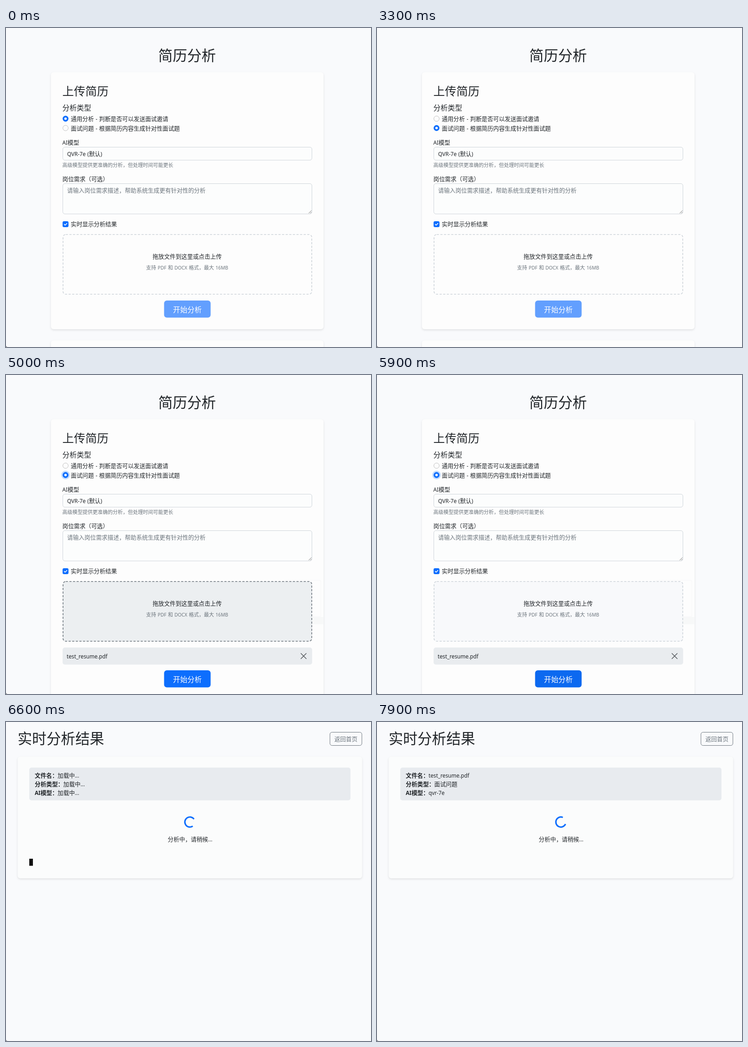
Animation of 800x700 px, one loop 8000 ms. Source, as an HTML page:

```html
<!DOCTYPE html>
<html lang="zh-CN">
<head>
<meta charset="utf-8">
<title>简历分析</title>
<style>
  html, body { margin: 0; width: 100%; height: 100%; overflow: hidden; background: #f9fafc; }
  svg { display: block; width: 800px; height: 700px; }
  text { font-family: "Noto Sans", "Noto Sans CJK SC", "Noto Sans CJK", sans-serif; fill: #212529; word-spacing: .06em; }
  .latin { font-size: .93em; }
  .muted { fill: #6c757d; }
  .light { fill: #fff; }
  .copy { fill: #1f4fd8; }
  .bold { font-weight: 700; }
  .card { fill: #fdfdfd; filter: drop-shadow(0 2px 2px rgba(0, 0, 0, .1)); }
  .field { fill: #fcfdfd; stroke: #ced4da; }
  .panel { fill: #e9ecef; }
</style>
</head>
<body>
<svg viewBox="0 0 800 700" id="stage"></svg>
<script>
const LOOP = 8000, STEP = 100;
const BODY = 12.65, SMALL = 11.05, LARGE = 15.8, HEADING = 25.3, TITLE = 31.6;
const BLUE = '#0d6efd';

// Latin runs are set slightly smaller than the Chinese around them.
const latin = str => str.replace(/[\x20-\x7e]+/g, s => `<tspan class="latin">${s}</tspan>`);

// Text is placed by its vertical centre.
function text(x, cy, size, str, cls = '', anchor = 'start') {
  return `<text x="${x}" y="${cy + size * .38}" font-size="${size}" class="${cls}" text-anchor="${anchor}">${latin(str)}</text>`;
}

function rect(x, y, w, h, r, attrs = '') {
  return `<rect x="${x}" y="${y}" width="${w}" height="${h}" rx="${r}" ${attrs}/>`;
}

function radio(id, cy) {
  return `<g id="${id}"><circle class="ring" cx="130.5" cy="${cy}" r="9.4" fill="#c2dbfe"/>
    <circle class="off" cx="130.5" cy="${cy}" r="5.9" fill="#fdfdfd" stroke="#bfbfbf"/>
    <g class="on"><circle cx="130.5" cy="${cy}" r="6.4" fill="${BLUE}"/>
    <circle cx="130.5" cy="${cy}" r="2.7" fill="#fff"/></g></g>`;
}

const uploadPage = `<g id="upload">
  ${text(397, 60.3, TITLE, '简历分析', '', 'middle')}
  ${rect(98.5, 97, 597.5, 564, 6, 'class="card" id="card"')}
  ${rect(98.5, 685.5, 597.5, 60, 6, 'class="card" id="nextCard"')}
  ${text(123.5, 138, HEADING, '上传简历')}
  ${text(123.5, 174.5, LARGE, '分析类型')}
  ${radio('general', 199)}${radio('interview', 219.5)}
  ${text(142, 199.5, BODY, '通用分析 - 判断是否可以发送面试邀请')}
  ${text(142, 220, BODY, '面试问题 - 根据简历内容生成针对性面试题')}
  ${text(123.5, 251.5, BODY, 'AI模型')}
  ${rect(124.5, 261.5, 546, 28.5, 4.5, 'class="field"')}
  ${text(134, 276, BODY, 'QVR-7e (默认)')}
  ${text(123.5, 300.5, SMALL, '高级模型提供更准确的分析，但处理时间可能更长', 'muted')}
  ${text(123.5, 331.5, BODY, '岗位需求（可选）')}
  ${rect(124.5, 341.5, 546, 66.5, 4.5, 'class="field"')}
  ${text(134, 356, BODY, '请输入岗位需求描述，帮助系统生成更有针对性的分析', 'muted')}
  <path d="M663.5 406.5l6-6M667 406.5l2.5-2.5" stroke="#666" stroke-width=".9"/>
  ${rect(124, 424, 13, 13, 3.2, `fill="${BLUE}"`)}
  <path d="M127.6 430.7l2 2 3.9-4" fill="none" stroke="#fff" stroke-width="1.6" stroke-linecap="round" stroke-linejoin="round"/>
  ${text(142, 430.5, BODY, '实时显示分析结果')}
  <g id="trail">${rect(611, 450.5, 79, 80, 3, 'fill="#fdfdfd" stroke="#f7f7f8"')}
    ${rect(661, 531, 34.5, 16, 0, 'fill="#f7f8f8"')}</g>
  <g id="drop">
    ${rect(125, 453.2, 545.2, 131, 6, 'id="zone" stroke-width="1.6" stroke-dasharray="4.75 3.15"')}
    ${text(397, 501.5, BODY, '拖放文件到这里或点击上传', '', 'middle')}
    ${text(397, 525.5, SMALL, '支持 PDF 和 DOCX 格式，最大 16MB', 'muted', 'middle')}
  </g>
  <g id="fileRow">
    ${rect(124, 598, 547, 37.5, 5, 'class="panel"')}
    ${text(133, 617, BODY, 'test_resume.pdf')}
    <path d="M646.5 611l11.5 11.5M658 611l-11.5 11.5" stroke="#55595d" stroke-width="1.5" stroke-linecap="round"/>
  </g>
  <g id="button">
    ${rect(343.5, 595, 108, 43.5, 9, 'id="buttonRing" fill="#9fc4fe"')}
    ${rect(346.5, 598, 102, 37.5, 6, 'id="buttonFace"')}
    ${text(397.5, 618, LARGE, '开始分析', 'light', 'middle')}
  </g>
  <g id="progress">
    ${text(123.5, 664.5, BODY, '处理中...')}
    ${text(671, 664.5, BODY, '0%', '', 'end')}
    ${rect(124, 676.5, 547, 12.5, 5, 'class="panel"')}
    ${text(123.5, 703, SMALL, '分析可能需要几分钟时间，请耐心等待', 'muted')}
  </g>
  <g id="dragged">
    ${rect(.5, .5, 79, 80, 3, 'fill="#fafafb" stroke="#3c3c3c"')}
    ${rect(49, 84, 37, 15.5, 1, 'fill="#fafbfb"')}
    <path d="M52.5 91h7M56 87.5v7" stroke="#222" stroke-width="1.1"/>
    ${text(64, 91.5, 9.6, '复制', 'copy')}
  </g>
</g>`;

const info = (cy, label, x, id) =>
  text(63, cy, BODY, label, 'bold') +
  `<g id="${id}Loading">${text(x, cy, BODY, '加载中...')}</g>`;

const detail = (cy, x, value) => text(x, cy, BODY, value);

const resultPage = `<g id="result">
  ${text(25.5, 35.5, TITLE, '实时分析结果')}
  ${rect(710, 22.5, 70, 29, 4.5, 'fill="none" stroke="#6c757d"')}
  ${text(745, 37, BODY, '返回首页', 'muted', 'middle')}
  ${rect(25.5, 76, 755, 267, 6, 'class="card" style="fill:#fbfcfc"')}
  ${rect(51, 100, 704, 72, 5, 'fill="#e8ebef"')}
  ${text(63, 117.5, BODY, '文件名：', 'bold')}
  ${text(63, 136.5, BODY, '分析类型：', 'bold')}
  ${text(63, 155.5, BODY, 'AI模型：', 'bold')}
  <g id="loading">${details('加载中...', '加载中...', '加载中...')}</g>
  <g id="loaded">${details('test_resume.pdf', '面试问题', 'qvr-7e')}</g>
  <circle id="spinner" cx="403" cy="219.5" r="11" fill="none" stroke="${BLUE}" stroke-width="3.2" pathLength="4" stroke-dasharray="3 1"/>
  ${text(403.5, 257.5, BODY, '分析中，请稍候...', '', 'middle')}
  ${rect(51, 300, 8, 15.5, 0, 'id="caret" fill="#111"')}
</g>`;

function details(file, kind, model) {
  return text(113, 117.5, BODY, file) + text(125.5, 136.5, BODY, kind) + text(113, 155.5, BODY, model);
}

const corner = '<path d="M0 696.5Q.3 699.7 4 700H0Z" fill="#777"/>';
document.getElementById('stage').innerHTML = uploadPage + resultPage + corner;

const $ = id => document.getElementById(id);
const show = (el, on) => { el.style.display = on ? '' : 'none'; };
const fade = (t, start, ms) => t < start ? 0 : Math.min(1, (t - start + 50) / ms);
const mix = (a, b, p) => `color-mix(in srgb, ${b} ${p * 100}%, ${a})`;

const DRAG = [[611, 450], [505, 449], [402, 448], [328, 447], [299, 447]];

function setRadio(id, on, focus) {
  const el = $(id);
  show(el.querySelector('.on'), on);
  show(el.querySelector('.off'), !on);
  show(el.querySelector('.ring'), focus);
}

function drawUpload(t) {
  const second = t >= 1600, dropped = t >= 5000, clicked = t >= 6200, busy = t >= 6300;
  const focus = t >= 1500 && !clicked && !(t >= 3300 && t < 3400);
  setRadio('general', !second, false);
  setRadio('interview', second, focus);

  const dragging = t >= 3700 && !dropped;
  show($('dragged'), dragging);
  show($('trail'), t >= 3700);
  if (dragging) {
    const [x, y] = DRAG[Math.min(DRAG.length - 1, (t - 3700) / STEP)];
    $('dragged').setAttribute('transform', `translate(${x} ${y})`);
  }

  const over = fade(t, 3700, 300);
  $('zone').style.fill = dropped
    ? mix('#e9ecef', '#f8f9fb', fade(t, 5000, 250))
    : mix('#fdfdfd', '#e9ecef', over);
  $('zone').style.stroke = mix('#ced4da', '#6c757d', over * (1 - fade(t, 5700, 250)));
  $('drop').style.opacity = 1 - .4 * fade(t, 6300, 200);

  show($('fileRow'), dropped);
  show($('progress'), busy);
  show($('nextCard'), !dropped);
  $('card').setAttribute('height', dropped ? 640 : 564);

  show($('button'), !busy);
  show($('buttonRing'), clicked);
  $('button').setAttribute('transform', `translate(0 ${dropped ? 50 : 0})`);
  $('buttonFace').style.fill = !dropped ? '#629ffe'
    : clicked ? '#0a58ca'
    : mix(BLUE, '#0b5ed7', fade(t, 5900, 150));
}

function drawResult(t) {
  const loaded = t >= 7100;
  show($('loading'), !loaded);
  show($('loaded'), loaded);
  const angle = 55 + (t - 6600) / 680 * 360;
  $('spinner').setAttribute('transform', `rotate(${angle} 403 219.5)`);
  show($('caret'), (t - 6550) % 900 < 450);
}

const start = performance.now();
function tick() {
  const t = Math.floor((performance.now() - start) % LOOP / STEP) * STEP;
  const done = t >= 6600;
  show($('upload'), !done);
  show($('result'), done);
  (done ? drawResult : drawUpload)(t);
  requestAnimationFrame(tick);
}
tick();
</script>
</body>
</html>
```
